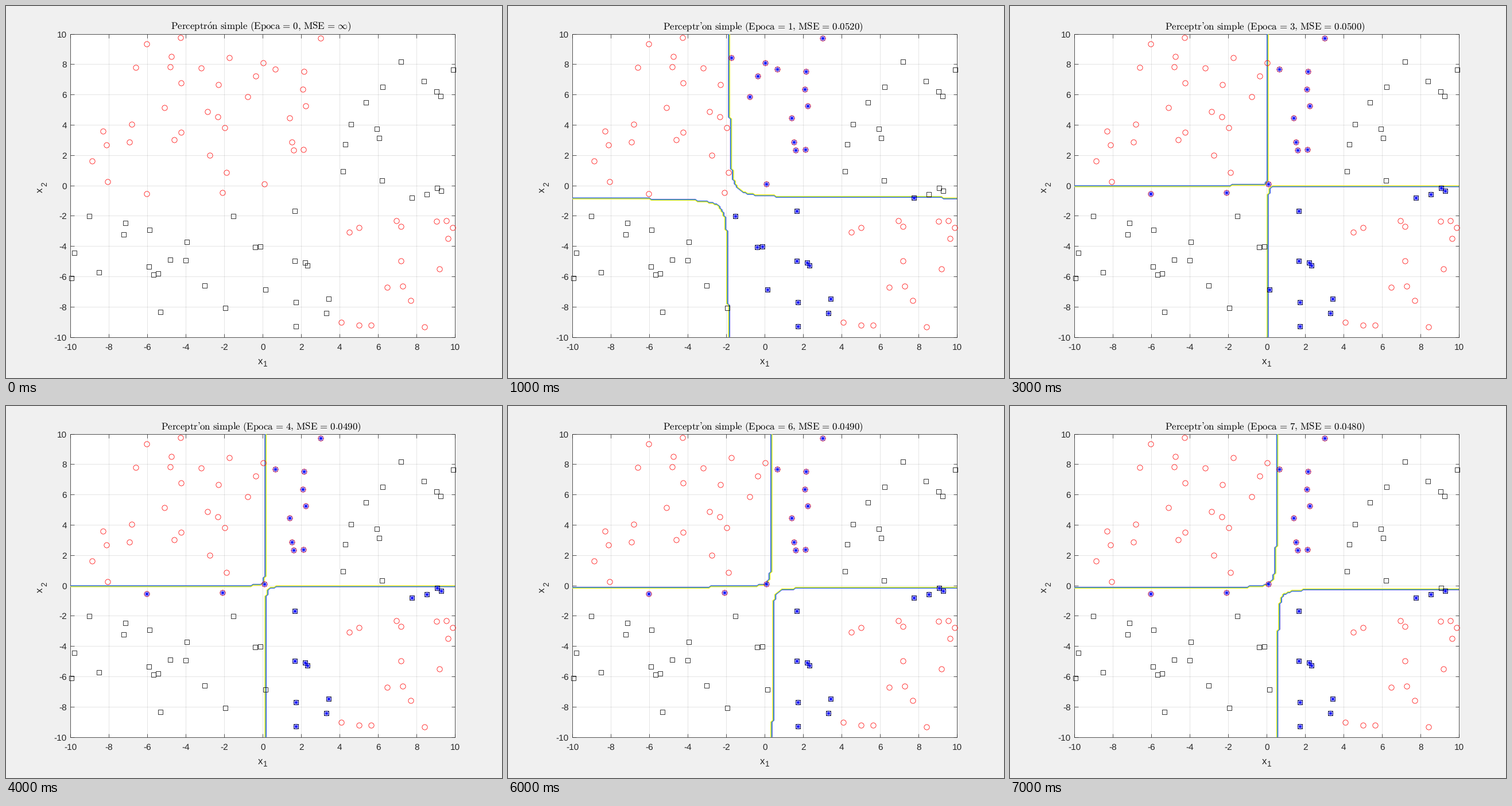
A matplotlib script that plays this animation: 864 px wide and 648 px high, repeating every 8000 ms.

```python
import matplotlib.pyplot as plt
import numpy as np
from matplotlib.animation import FuncAnimation

W, H, DPI = 864, 648, 72
INK = "#262626"
THIN = 0.77
EM = 16.93

plt.rcParams.update({
    "font.family": "Liberation Sans",
    "mathtext.fontset": "cm",
    "text.hinting": "none",
})

# Samples of both classes, as x, y pairs in stage pixels
CIRCLES = [
    245, 66, 304, 55, 288, 88.5, 286, 106, 226, 107.5, 340, 108.5,
    388.5, 90.5, 305, 134, 370, 137, 276, 177, 351, 184, 369, 193.5,
    381, 212, 169.5, 218, 219, 206.5, 305, 220.5, 293, 233.5, 175.5, 242.5,
    215, 237.5, 355, 260, 150, 270, 384, 290, 177, 306, 245, 327.5,
    377, 325, 448, 99.5, 435, 122.5, 421, 158.5, 469, 110, 519, 114.5,
    548, 56, 516.5, 145.5, 522, 174, 494, 195, 498, 237, 501, 251,
    518, 250, 450, 310.5, 598, 394, 615, 386, 680, 374, 688, 384.5,
    750, 375.5, 767, 374.5, 778, 386, 770, 405.5, 688, 444, 755, 458,
    664, 489.5, 691, 487.5, 705, 513, 584, 551, 615, 556, 635.5, 556,
    729, 559,
]
SQUARES = [
    688, 97, 779, 111.5, 728, 131, 656, 141, 750, 149, 757, 157,
    627, 168, 601, 206.5, 646, 214.5, 650, 230.5, 591, 241.5, 587, 288.5,
    655, 304, 751, 317, 758, 322, 733, 328, 707, 334.5, 502.5, 357,
    395.5, 366, 145.5, 366, 208, 378, 205, 398, 250.5, 390, 314.5, 411,
    119.5, 429.5, 313, 443.5, 286, 442, 249, 454, 257, 468, 265, 466.5,
    162, 464, 114, 473.5, 345.5, 486.5, 269, 533, 381.5, 526, 434, 420,
    442.5, 419.5, 502.5, 444, 520.5, 447.5, 525, 452, 451.5, 493.5,
    504.5, 516, 505, 557.5, 562, 510, 558, 534.5,
]

# Per epoch: sign, a, b, c of sign * ((x - a)(y - b) - c), and the error
EPOCHS = [
    (1, -1.857, -0.827, 0.300, "0.0520"),
    (-1, -0.520, 0.2465, 0.140, "0.0849"),
    (1, 0.068, -0.009, -0.0175, "0.0500"),
    (1, 0.152, -0.039, -0.029, "0.0490"),
    (1, 0.237, -0.069, -0.0405, "0.0490"),
    (1, 0.390, -0.127, -0.088, "0.0490"),
    (1, 0.550, -0.193, -0.139, "0.0480"),
]

LEVELS = np.linspace(-0.8, 0.8, 9)
COLORS = ["#3e26a8", "#4746eb", "#3e70ff", "#2797eb", "#12b1c6",
          "#38c395", "#a0c943", "#fbc03c", "#f9fb15"]

fig = plt.figure(figsize=(W / DPI, H / DPI), dpi=DPI, facecolor="#f0f0f0")
ax = fig.add_axes([0.13, 0.11, 0.775, 0.815])
ax.set(xlim=(-10, 10), ylim=(-10, 10))
ticks = range(-10, 11, 2)
ax.set_xticks(ticks)
ax.set_yticks(ticks)
ax.tick_params(direction="in", length=6.5, width=THIN, color=INK, top=True,
               right=True, labelbottom=False, labelleft=False)
ax.grid(color=INK, alpha=0.15, lw=THIN)
ax.set_axisbelow(True)
for spine in ax.spines.values():
    spine.set(color=INK, linewidth=THIN)


def put(x, y, s, size, **kw):
    """Text with its baseline at a stage pixel."""
    return fig.text(x / W, 1 - y / H, s, fontsize=size,
                    **{"color": INK, "va": "baseline", **kw})


def to_data(pixels):
    px, py = np.reshape(pixels, (-1, 2)).T
    return np.array([(px - 447.12) / 33.48, (312.66 - py) / 26.406])


def markers(points, shape, size, color, z):
    return ax.plot(*points, ls="", marker=shape, ms=size, mfc="none",
                   mec=color, mew=THIN, clip_on=False, zorder=z)[0]


for v in ticks:
    put(447.4 + 33.48 * v, 598.7, str(v), 15.4, ha="center")
    put(106, 318.5 - 26.4 * v, str(v), 15.4, ha="right")
put(438.5, 624.5, "x", EM)
put(448, 628.5, "1", 13.5)
put(67.5, 321, "x", EM, rotation=90, ha="right")
put(74, 311.5, "2", 13.5, rotation=90, ha="right")

circles, squares = to_data(CIRCLES), to_data(SQUARES)
markers(circles, "o", 9.24, "red", 4)
markers(squares, "s", 7.4, "black", 4)
wrong = markers(([], []), (8, 2, 0), 9.24, "blue", 5)

title = put(270, 40.3, "", EM, color="black", math_fontfamily="cm")
# A raised comma has the shape of the apostrophe
apostrophe = put(270 + 3.742 * EM, 30.3, "", EM, color="black",
                 math_fontfamily="cm")

axis = np.linspace(-10, 10, 201)
GX, GY = np.meshgrid(axis, axis)
lines = []


def classify(x, y, epoch):
    sign, a, b, c, _ = EPOCHS[epoch - 1]
    return np.where((x - a) * (y - b) > c, sign, -sign)


def set_title(epoch):
    letter = r"\hspace{0.278}o" if epoch else r"\acute{o}"
    mse = EPOCHS[epoch - 1][4] if epoch else r"\infty"
    gap = r"\hspace{0.1333}"
    equals = gap + "=" + gap
    title.set_text(rf"$\mathrm{{Perceptr{letter}n\ simple\ (Epoca{equals}"
                   rf"{epoch},{gap}MSE{equals}{mse})}}$")
    title.set_x((270 if epoch else 287) / W)
    apostrophe.set_text(r"$\mathrm{,}$" if epoch else "")


def draw(epoch):
    while lines:
        lines.pop().remove()
    set_title(epoch)
    if epoch == 0:
        wrong.set_data([], [])
        return
    lines.append(ax.contour(GX, GY, classify(GX, GY, epoch), levels=LEVELS,
                            colors=COLORS, linewidths=THIN, zorder=3))
    wrong.set_data(*np.hstack([circles[:, classify(*circles, epoch) > 0],
                               squares[:, classify(*squares, epoch) < 0]]))


anim = FuncAnimation(fig, draw, frames=8, init_func=lambda: None,
                     interval=1000, repeat=True, repeat_delay=0, blit=False)
plt.show()
```
